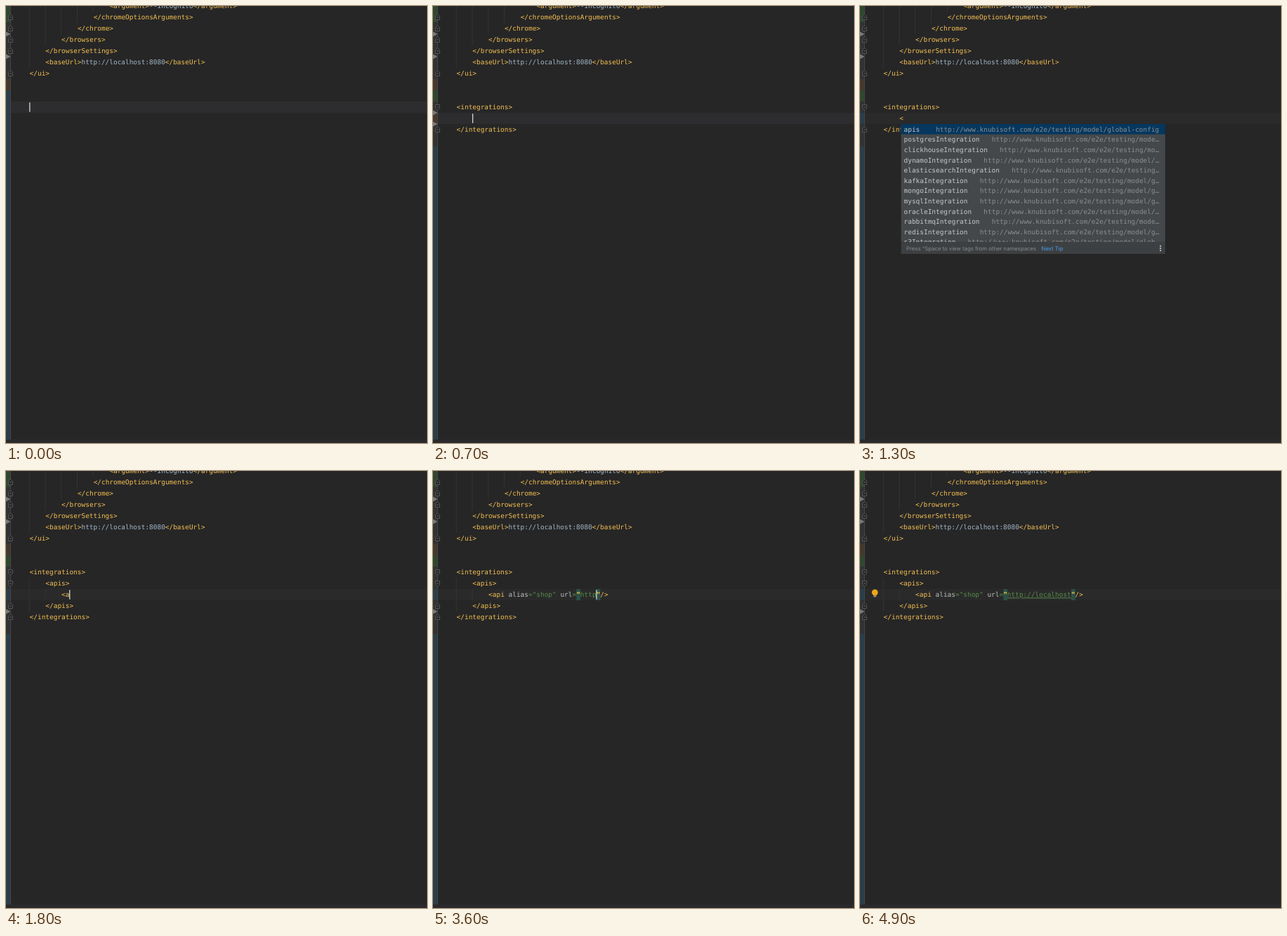
An HTML page for the animation above (5 s loop, 600 by 622 pixels).

```html
<!DOCTYPE html>
<html lang="en">
<head>
<meta charset="utf-8">
<title>Typing an integrations block</title>
<style>
  html, body { margin: 0; width: 100%; height: 100%; overflow: hidden; background: #262627; }
  svg { display: block; width: 600px; height: 622px; }
  text {
    font: 9.45px "DejaVu Sans Mono", "Noto Sans Mono", monospace;
    white-space: pre;
    text-rendering: geometricPrecision;
    fill: #a3b8c6;
  }
  .tag { fill: #f3bf50; }
  .attr { fill: #bdbdbd; }
  .str { fill: #578c49; }
  .link { text-decoration: underline; }
  .hit { fill: #ffc83c; font-weight: bold; }
  .item { fill: #c6c6c6; }
  .ns { fill: #8b8d8e; }
  .tip { font: 7.75px Inter, "Liberation Sans", sans-serif; fill: #87898b; }
  .next { fill: #4a9de8; }
</style>
</head>
<body>
<svg viewBox="0 0 600 622" xmlns="http://www.w3.org/2000/svg">
  <g id="stage"></g>
</svg>
<script>
const CELL = 5.69, LEFT = 33.6, ROW = 16, ITEM = 14.6, LOOP = 5000;
const NS = 'http://www.knubisoft.com/e2e/testing/model/global-config';
const stage = document.getElementById('stage');

const ROOT_TAGS = ['integrations', 'auth', 'delayBetweenScenarioRuns', 'stopScenarioOnFailure', 'variations'];
const DATA_TAGS = ['apis', ...['postgres', 'clickhouse', 'dynamo', 'elasticsearch', 'kafka', 'mongo',
  'mysql', 'oracle', 'rabbitmq', 'redis', 's3'].map(n => n + 'Integration')];

const HEAD = [
  [20, 0, '<argument>--incognito</argument>'],
  [16, 1, '</chromeOptionsArguments>'],
  [12, 2, '</chrome>'],
  [8, 3, '</browsers>'],
  [4, 4, '</browserSettings>'],
  [4, 5, '<baseUrl>http://localhost:8080</baseUrl>'],
  [0, 6, '</ui>']
];

const x = col => LEFT + col * CELL;
const y = row => row * ROW;
const esc = s => s.replace(/&/g, '&amp;').replace(/</g, '&lt;').replace(/>/g, '&gt;');
const span = (cls, s) => `<tspan class="${cls}">${esc(s)}</tspan>`;
const rect = (l, t, w, h, fill, more = '') =>
  `<rect x="${l}" y="${t}" width="${w}" height="${h}" fill="${fill}" ${more}/>`;
const text = (l, base, body, cls = '') => `<text x="${l}" y="${base}" class="${cls}">${body}</text>`;

// Colours tags, attribute names and strings
function paint(code, link) {
  const re = /(<\/?\w*|\/?>)|(="?)|(\w+(?==))|([^<>="]*")/g;
  if (!code.includes('="')) return code.replace(/(<\/?\w*>?)|([^<]+)/g, (m, tag) => span(tag ? 'tag' : '', m));
  return code.split(/("[^"]*")/).map(part => {
    if (part[0] !== '"') return part.replace(/(<\w+|\/>)|=|[^<=\/]+/g,
      (m, tag) => span(tag ? 'tag' : m === '=' ? 'str' : 'attr', m));
    const value = part.slice(1, -1);
    return span('str', '"') + span(link && value.includes('://') ? 'str link' : 'str', value) + span('str', '"');
  }).join('');
}

const line = ([col, row, code], link) => text(x(col), y(row) + 3.3, paint(code, link));
const caret = (col, row) => rect(x(col) - .4, y(row) - 6.7, 1.3, 13.4, '#d6d6d6');
const guide = (col, top, bottom) => rect(x(col) - .9, top, 1, bottom - top, '#343435');
const arrow = at => `<path d="M0 ${at - 3.5}L6.5 ${at}L0 ${at + 3.5}z" fill="#77797a"/>`;

function fold(row, dir) {
  const c = y(row);
  return `<path d="M3.5 ${c - 3.5 * dir}H9.5V${c + 1.5 * dir}L6.5 ${c + 4.3 * dir}L3.5 ${c + 1.5 * dir}z"
    fill="#262627" stroke="#606162" stroke-width=".8"/><path d="M5 ${c}h3" stroke="#747576" stroke-width=".8"/>`;
}

function popup(col, top, items, shown) {
  const l = x(col) - 3.5, w = 376.5, h = shown * ITEM, id = 'list';
  const rows = items.map((name, i) => {
    const base = top + ITEM * (i + .5) + 3.4;
    const free = 61 - name.length;
    const ns = NS.length < free ? NS : NS.slice(0, free - 1) + '…';
    return text(l + 4, base, name, 'item') + text(l + 4 + (64 - ns.length) * CELL, base, ns, 'ns');
  }).join('');
  const foot = top + h;
  const dots = [-3.2, 0, 3.2].map(d =>
    `<circle cx="${l + 369.7}" cy="${foot + 9 + d}" r="1.1" fill="#c4c4c4"/>`).join('');
  return rect(l - .5, top, w + 1, h + 17.5, '#1d1d1e', 'opacity=".6"') +
    rect(l, top, w, h, '#45484a') + rect(l, top, w, ITEM, '#05375f') +
    `<clipPath id="${id}">${rect(l, top, w, h, '#000')}</clipPath><g clip-path="url(#${id})">${rows}</g>` +
    rect(l, foot, w, 17, '#3d4042') +
    text(l + 7.5, foot + 11.7, 'Press ^Space to view tags from other namespaces', 'tip') +
    text(l + 200, foot + 11.7, 'Next Tip', 'tip next') + dots;
}

const bulb = () => `<circle cx="21.2" cy="172.8" r="4.4" fill="#e9a818"/>
  <path d="M19 175h4.4v2.5H19z" fill="#e9a818"/><path d="M19.2 178.7h4" stroke="#a7a7a7" stroke-width="1.2"/>`;

const GRAY = '#303234', GREEN = '#30472f', BROWN = '#45382c', BLUE = '#2a3e4a';

// Change markers: pairs of end position and colour, from the top down
function strip(marks) {
  let top = 0;
  return marks.map(([end, fill]) => {
    const part = rect(0, top, 6.6, end - top, fill);
    top = end;
    return part;
  }).join('');
}

function gutter(level) {
  const top = [[23, GREEN], [104, GRAY], [120, BROWN]];
  const rest = [
    [[617, BLUE]],
    [[136, GREEN], [152, GRAY], [168, BROWN], [200, GRAY], [617, BLUE]],
    [[136, GREEN], [152, GRAY], [168, BLUE], [200, GRAY], [617, BLUE]],
    [[136, GREEN], [168, GRAY], [184, BLUE], [232, GRAY], [617, BLUE]]
  ][level];
  const marks = [[40, 72], [40, 72, 152, 168], [40, 72], [40, 72, 200]][level];
  const closes = [1, 2, 3, 4, 6].concat([[], [11], [11], [12, 13]][level]);
  const opens = [[], [9], [9], [9, 10]][level];
  return strip(top.concat(rest)) + rect(6.2, 0, .8, 617, '#48494a') +
    marks.map(arrow).join('') + closes.map(r => fold(r, -1)).join('') + opens.map(r => fold(r, 1)).join('');
}

// Number of letters typed, one per step, the first at the given step
const typed = (word, n, first) => word.slice(0, Math.max(0, n - first + 1));

function opening(n) {
  const code = n < 4 ? '' : n < 6 ? '<' : '<integrations></integrations>';
  let out = line([0, 9, code]);
  if (n < 3) out += caret(0, 9);
  if (n === 6) out += caret(14, 9);
  if (n === 5) out += caret(1, 9) + popup(1, 152, ROOT_TAGS, 5);
  return out;
}

function inner(n) {
  const code = n < 11 ? '' : n < 15 ? '<' : '<apis></apis>';
  let out = line([0, 9, '<integrations>']) + line([4, 10, code]) + line([0, 11, '</integrations>']);
  if (n < 10) out += caret(4, 10);
  if (n === 11) out += caret(5, 10);
  if (n === 15) out += caret(10, 10);
  if (n > 11 && n < 15) out += popup(5, 168, DATA_TAGS, 11.5);
  return out;
}

function entry(n) {
  const name = typed('shop', n, 21);
  const url = n < 37 ? typed('http', n, 33) : 'http' + typed('://localhost', n, 37);
  const code = n < 18 ? '' : n < 20 ? '<api'.slice(0, (n - 17) * 2) : `<api alias="${name}" url="${url}"/>`;
  const first = 20, second = 27 + name.length, end = second + url.length;
  let out = '', over = '';
  const box = (col, len, active) => rect(x(col) - .6, 168.6, len * CELL + 1.6, 14.8, 'none',
    `stroke="${active ? '#4aa3d8' : '#55585a'}" stroke-width="${active ? 1.2 : .9}"`);

  if (n >= 31) {
    for (const col of [second - 1, end]) out += rect(x(col), 168, CELL, 16, '#2c5148');
    over += text(x(second - 1), 179.3, '"', 'hit') + text(x(end), 179.3, '"', 'hit');
  } else if (n >= 20) {
    over += box(first, name.length, n < 28) + box(second + 4 - 4, 0, n >= 28);
  }
  if (n < 20) over += caret(8 + code.length, 11);
  else if (n < 28) over += caret(first + name.length, 11);
  else if (n < 49) over += caret(end, 11);
  if (n === 49) over += bulb();

  return out + line([0, 9, '<integrations>']) + line([4, 10, '<apis>']) + line([8, 11, code], true) +
    line([4, 12, '</apis>']) + line([0, 13, '</integrations>']) + over;
}

function draw(n) {
  const level = n < 7 ? 0 : n < 11 ? 1 : n < 16 ? 2 : 3;
  const active = [9, 10, 10, 11][level];
  const guides = guide(0, 0, 88) + guide(4, 0, 56) + guide(8, 0, 40) + guide(12, 0, 24) + guide(16, 0, 8) +
    (level === 3 ? guide(0, 152, 200) + guide(4, 168, 184) : '');
  stage.innerHTML = rect(0, 0, 600, 622, '#262627') +
    rect(7, y(active) - 8, 593, 16, level < 2 ? '#2d2c2e' : '#2a2a2b') +
    rect(0, 617, 600, 5, '#2a2a2c') + guides + gutter(level) +
    HEAD.map(l => line(l)).join('') +
    (level === 0 ? opening(n) : level < 3 ? inner(n) : entry(n));
}

const start = performance.now();
let last = -1;
function tick() {
  const n = Math.floor((performance.now() - start) % LOOP / 100);
  if (n !== last) draw(last = n);
  requestAnimationFrame(tick);
}
tick();
</script>
</body>
</html>
```
